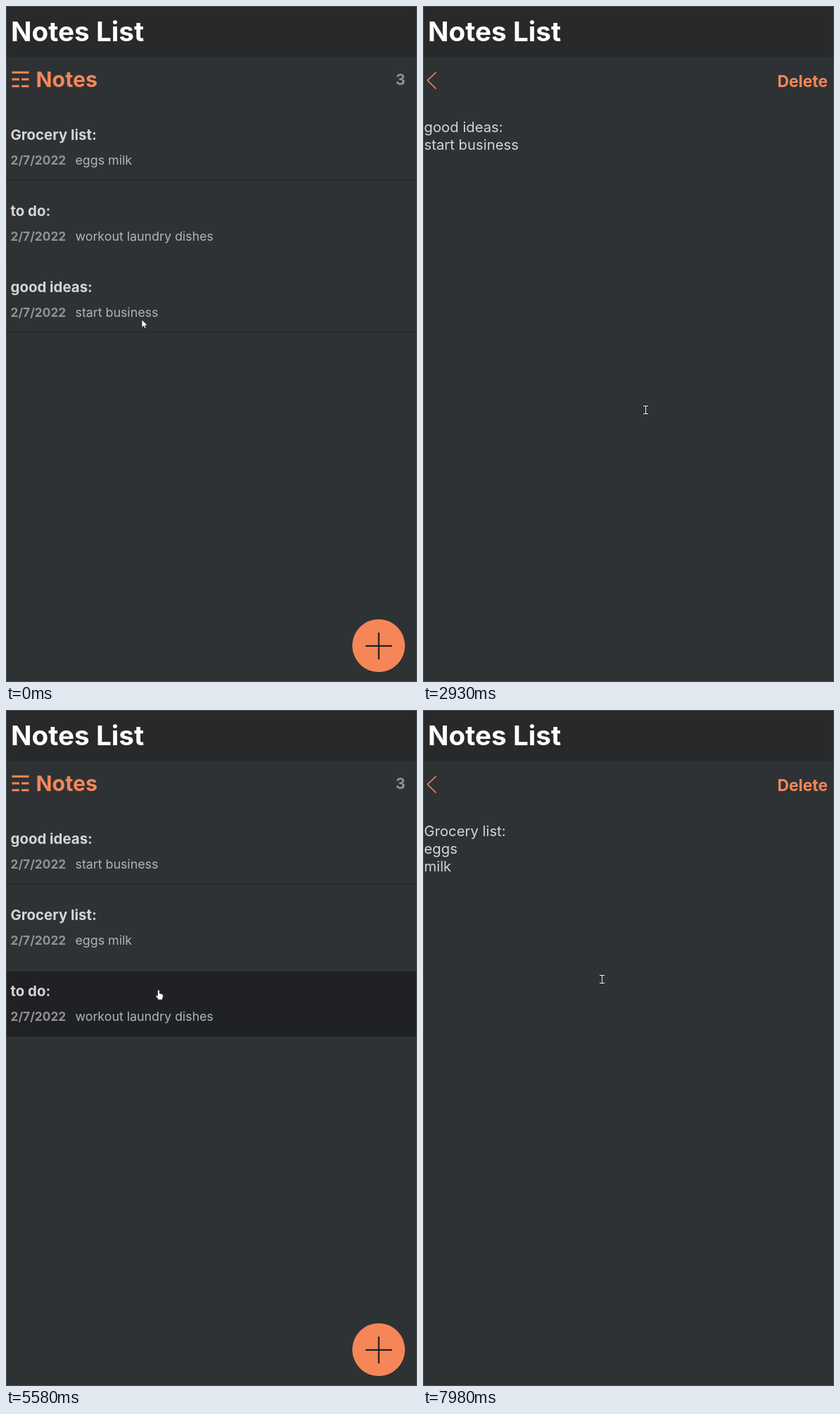
Recreate the animation shown at these times as an HTML page. Size 584 px wide and 959 px high, loop 8 s.

```html
<!DOCTYPE html>
<html lang="en">
<head>
<meta charset="utf-8">
<title>Notes List</title>
<style>
  html, body { margin: 0; height: 100%; overflow: hidden; background: #2e3235; }
  svg { display: block; width: 100vw; height: 100vh; font-family: Lexend, Inter, sans-serif; }
  .accent { fill: #f68657; }
  .heading { font-size: 38.7px; font-weight: 700; fill: #fff; }
  .section { font-size: 30.3px; font-weight: 650; }
  .count { font-size: 21.5px; font-weight: 700; fill: #909294; text-anchor: end; }
  .title { font-size: 20.4px; font-weight: 650; fill: #d6d5d4; }
  .date { font-size: 17.3px; font-weight: 700; fill: #919293; }
  .preview { font-size: 17.8px; fill: #adb5bd; }
  .delete { font-size: 22.8px; font-weight: 650; text-anchor: end; }
  .body { font-size: 20.3px; fill: #d4d4d4; }
  .line { fill: none; stroke: #f68657; stroke-width: 1.6; }
</style>
</head>
<body>
<svg viewBox="0 0 584 959" preserveAspectRatio="none">
  <rect width="584" height="959" fill="#2e3235"/>
  <rect width="584" height="73" fill="#28292b"/>
  <text class="heading" x="7" y="50">Notes List</text>
  <g id="screen"></g>
  <rect x=".5" y=".5" width="583" height="958" fill="none" stroke="#4c4f51"/>
  <path id="cursor" stroke-linejoin="round"/>
</svg>
<script>
const LOOP = 8000, FADE = 250;

const grocery = ['Grocery list:', 'eggs', 'milk'];
const todo = ['to do:', 'workout', 'laundry', 'dishes'];
const ideas = ['good ideas:', 'start business'];

// Pointer shapes, drawn around their hot spot
const shapes = {
  arrow: { d: 'M0 0V11L2.6 8.7L4.2 12.3L6 11.5L4.5 8.1H8Z', fill: '#fff', stroke: '#1c1d1f', 'stroke-width': .6 },
  hand: { d: 'M-1.5 1.3A1.3 1.3 0 0 1 1.1 1.3V5L5 6Q6.6 6.6 6.3 8.8L5 14H-.5L-3.8 9.4Q-4.6 7.5 -3 7.6L-1.5 9Z', fill: '#fff', stroke: '#1c1d1f', 'stroke-width': .6 },
  beam: { d: 'M-3.5 -5.5H3.5M0 -5V5M-3.5 5.5H3.5', fill: 'none', stroke: '#eee', 'stroke-width': 1 }
};

// The pointer moves in steps: time, shape, hot spot
const steps = [
  [0, 'arrow', 193, 445], [140, 'hand', 195, 434], [320, 'hand', 198, 424], [450, 'hand', 188, 414],
  [1650, 'beam', 188.5, 415], [1790, 'beam', 188.5, 415], [2470, 'beam', 242.5, 497],
  [2790, 'beam', 314.5, 572], [2930, 'beam', 316.5, 573], [3620, 'beam', 250.5, 455],
  [3750, 'beam', 107.5, 282], [3900, 'beam', 70.5, 215], [4030, 'beam', 40.5, 165],
  [4150, 'beam', 24.5, 128], [4280, 'hand', 15, 107], [4700, 'arrow', 15, 107],
  [4840, 'arrow', 15, 107], [4960, 'arrow', 13, 102], [5320, 'hand', 200, 441],
  [5450, 'hand', 214, 410], [5580, 'hand', 217, 397], [5720, 'hand', 214, 330],
  [5850, 'hand', 210, 222], [5990, 'hand', 209, 225], [6120, 'hand', 208, 228],
  [6260, 'hand', 208, 272], [6400, 'hand', 202, 290], [6520, 'hand', 199, 295],
  [6790, 'beam', 200.5, 297], [6920, 'beam', 200.5, 297], [7980, 'beam', 254.5, 382]
];

// Row, hover start, hover end
const hovers = [[2, 0, 1790], [2, 5250, 5650], [0, 5800, 6260], [1, 6260, LOOP]];

const screen = document.getElementById('screen');
const cursor = document.getElementById('cursor');
const clamp = v => Math.max(0, Math.min(1, v));
const text = (cls, x, y, s) => `<text class="${cls}" x="${x}" y="${y}">${s}</text>`;

function hoverLevel(row, t) {
  return Math.max(...hovers.map(([r, on, off]) =>
    r === row ? Math.min(clamp((t - on) / FADE), 1 - clamp((t - off) / FADE)) : 0));
}

function noteRow([title, ...lines], row, t) {
  const y = Math.round(row * 108.2);
  return `<g transform="translate(0 ${y})">
    <rect x="1" y="246" width="582" height="1.3" fill="#26292c"/>
    <rect x="1" y="155" width="582" height="92" fill="#202125" opacity="${hoverLevel(row, t)}"/>
    ${text('title', 6.5, 189.5, title)}${text('date', 6.5, 225, '2/7/2022')}
    ${text('preview', 98.5, 225, lines.join(' '))}</g>`;
}

function listScreen(notes, t) {
  return `<path class="accent" d="M8.5 92.7h24v3h-24zM8.5 102.5h10.5v3h-10.5zM22 102.5h10.5v3h-10.5zM8.5 112.3h10.5v3h-10.5zM22 112.3h10.5v3h-10.5z"/>
    ${text('section accent', 42.5, 115, 'Notes')}${text('count', 567.5, 112, notes.length)}
    ${notes.map((note, row) => noteRow(note, row, t)).join('')}
    <circle cx="530" cy="909" r="38" fill="#25282a" opacity=".5"/>
    <circle class="accent" cx="529.5" cy="907.5" r="37.5"/>
    <path d="M511 907.8H548.5M529.7 889V927" stroke="#202124" stroke-width="2.2"/>`;
}

function noteScreen(lines) {
  return `<path class="line" d="M18.5 94L6.5 105.5L18.5 117.5"/>
    ${text('delete accent', 575, 115, 'Delete')}
    ${lines.map((line, i) => text('body', 1.5, 178.5 + 25 * i, line)).join('')}`;
}

function screenAt(t) {
  if (t < 1790) return listScreen([grocery, todo, ideas], t);
  if (t < 4840) return noteScreen(ideas);
  if (t < 6920) return listScreen([ideas, grocery, todo], t);
  return noteScreen(grocery);
}

let shown;
function tick(now) {
  const t = now % LOOP;
  const step = steps.findLast(s => s[0] <= t);
  if (step !== shown) {
    shown = step;
    const [time, shape, x, y] = step;
    screen.innerHTML = screenAt(time);
    for (const [name, value] of Object.entries(shapes[shape])) cursor.setAttribute(name, value);
    cursor.setAttribute('transform', `translate(${x} ${y})`);
  }
  requestAnimationFrame(() => tick(performance.now() - start));
}
const start = performance.now();
tick(0);
</script>
</body>
</html>
```
